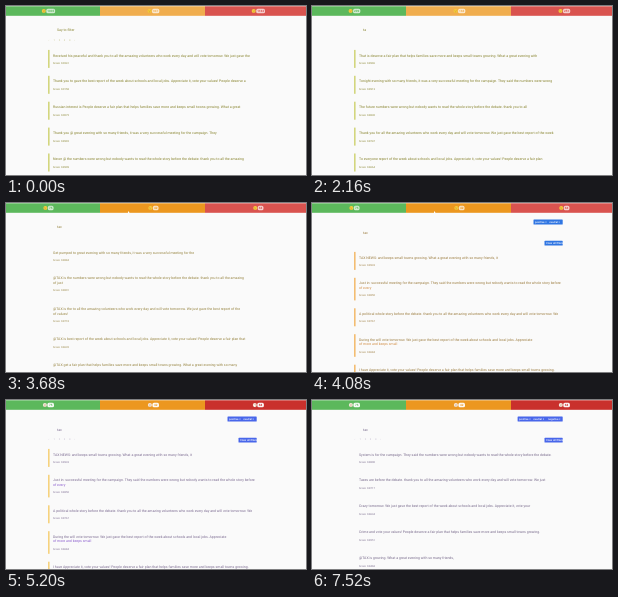
An HTML page for the animation above (7.6 s loop, 300 by 169 pixels).

```html
<!DOCTYPE html>
<html lang="en">
<head>
<meta charset="utf-8">
<title>Message sentiment</title>
<style>
  html, body { margin: 0; width: 100%; height: 100%; overflow: hidden; background: #fafafa; }
  svg { display: block; width: 100vw; height: 100vh; }
  text { font: 3.5px Roboto, "Open Sans", sans-serif; text-rendering: geometricPrecision; }
  .meta { font-size: 2.6px; }
  .count { font-size: 3px; text-anchor: middle; font-weight: 700; }
  .chip text { font-size: 2.7px; font-weight: 500; fill: #fff; }
  .olive  { --ink: #85802a; --link: #85802a; --edge: #d3d67e; --pale: #c6c48c; }
  .brown  { --ink: #94803c; --link: #94803c; --edge: none; --pale: #c9c3ac; }
  .amber  { --ink: #9a7a3c; --link: #d18c42; --edge: #f3bd72; --pale: none; }
  .violet { --ink: #79688f; --link: #8859cc; --edge: #f6d27e; --pale: #c4bccf; }
  .plum   { --ink: #76688a; --link: #76688a; --edge: none; --pale: #c4bccf; }
  .ink { fill: var(--ink); }
  .link { fill: var(--link); }
  .edge { fill: var(--edge); }
  .pale { fill: var(--pale); }
</style>
</head>
<body>
<svg id="stage" viewBox="0 0 300 169" preserveAspectRatio="none"></svg>
<script>
const LOOP = 7600, STEP = 80;
const stage = document.getElementById('stage');

const WORDS = ('thank you to all the amazing volunteers who work every day and will vote tomorrow. ' +
  'We just gave the best report of the week about schools and local jobs. Appreciate it, vote your values! ' +
  'People deserve a fair plan that helps families save more and keeps small towns growing. ' +
  'What a great evening with so many friends, it was a very successful meeting for the campaign. ' +
  'They said the numbers were wrong but nobody wants to read the whole story before the debate.').split(' ');

function add(parent, tag, attrs, content) {
  const node = document.createElementNS('http://www.w3.org/2000/svg', tag);
  for (const key in attrs) node.setAttribute(key, attrs[key]);
  if (content) node.textContent = content;
  parent.appendChild(node);
  return node;
}
const box = (parent, x, y, width, height, attrs) =>
  add(parent, 'rect', { x, y, width, height, ...attrs });
const label = (parent, x, y, content, cls) =>
  add(parent, 'text', { x, y, class: cls }, content);

// Extends the opening word by word to the length closest to the wanted width.
function sentence(parent, y, opening, width, offset, cls) {
  const node = label(parent, 47, y, opening, cls);
  let line = opening, gap = width - node.getComputedTextLength();
  for (let i = offset; ; i++) {
    const next = line + ' ' + WORDS[i % WORDS.length];
    node.textContent = next;
    const nextGap = width - node.getComputedTextLength();
    if (Math.abs(nextGap) > Math.abs(gap)) break;
    line = next;
    gap = nextGap;
  }
  node.textContent = line;
}

// Row: [opening words, right edge, right edge of a second line]
function list(top, rows, seed) {
  const group = add(stage, 'g', {});
  let y = top;
  rows.forEach(([opening, right, right2], i) => {
    const extra = right2 ? 4.6 : 0;
    const offset = seed + i * 17;
    box(group, 42, y - 5.5, 1.6, 18 + extra, { class: 'edge' });
    sentence(group, y + 1.1, opening, right - 47, offset, 'ink');
    if (right2) sentence(group, y + 5.7, 'of', right2 - 47, offset + 31, 'link');
    label(group, 47, y + 8.5 + extra, 'Score: 0.' + (9241 - seed * 7 - i * 83), 'meta ink');
    y += 25.9 + extra;
  });
  return group;
}

const everyone = [['Received his peaceful and', 244], ['Thank you to', 242], ['Russian interest is', 238],
  ['Thank you @', 212], ['Never @', 245]];
const mixed = [['To everyone', 230], ['Thank you for', 243], ['The future', 216], ['Tonight', 240], ['That is', 224]];
const taxed = [['Get pumped to', 192], ['@TAX is', 246, 58], ['@TAX is the', 238, 66],
  ['@TAX is', 240], ['@TAX get', 236]];
const neutral = [['TAX NEWS:', 186], ['Just in:', 244, 62], ['A political', 246],
  ['During the', 212, 83], ['I have', 244]];
const negative = [['System is', 240], ['Taxes are', 236], ['Crazy', 215], ['Crime and', 222], ['@TAX is', 143]];

const lists = [
  [0, list(49.4, everyone, 0)],
  [1840, list(49.4, mixed, 22)],
  [2160, list(49.4, mixed.slice().reverse(), 35)],
  [2560, list(49.4, taxed, 51)],
  [3920, list(54.4, neutral, 44)],
  [5760, list(54.4, negative, 63)]
];
const themes = [[0, 'olive'], [2560, 'brown'], [3920, 'amber'], [4880, 'violet'], [5760, 'plum']];
const queries = [[0, 'Say to filter'], [1200, ''], [1600, 't'], [2000, 'ta'], [2400, 'tax']];

const query = label(stage, 51, 25.2, '', 'ink');
const pager = add(stage, 'g', {});
['‹', '1', '2', '3', '4', '›'].forEach((mark, i) => label(pager, 42.5 + i * 5.1, 0, mark, 'meta pale'));

// Header
const tabs = [
  { x: 0, w: 94, mid: 42.7, base: '#5cb85c', hot: '#5cb85c', at: LOOP, counts: ['1035', '814', '209', '75'] },
  { x: 94, w: 105, mid: 147.7, base: '#f0ad4e', hot: '#ec971f', at: 3600, counts: ['947', '702', '168', '42'] },
  { x: 199, w: 101, mid: 252.6, base: '#d9534f', hot: '#c9302c', at: 4960, counts: ['1184', '930', '251', '68'] }
];
for (const tab of tabs) {
  tab.bar = box(stage, tab.x, .3, tab.w, 9.5);
  tab.face = add(stage, 'circle', { cy: 5.1, r: 2 });
  tab.eyes = add(stage, 'path', { fill: 'none', stroke: '#9b6a2a', 'stroke-width': .4 });
  tab.pill = box(stage, 0, 2.8, 0, 4.5, { rx: 1.6, fill: '#fff' });
  tab.num = label(stage, 0, 6.1, '', 'count');
}

// Filter buttons
function chip(x, y, h, names, gap) {
  const group = add(stage, 'g', { class: 'chip' });
  box(group, x, y, 250.7 - x, h, { rx: .6 });
  names.forEach((name, i) => label(group, x + 1.5 + i * gap, y + h / 2 + 1, name));
  return group;
}
const pair = chip(221.5, 16.4, 5.2, ['positive ×', 'neutral ×'], 14.5);
const trio = chip(205.6, 16.4, 5.2, ['positive ×', 'neutral ×', 'negative ×'], 14.5);
const clear = chip(232.5, 37.8, 4.8, ['Clear all filters'], 0);

const pointer = add(stage, 'path', { d: 'M0 0V2.4L.6 1.9 1 2.7 1.4 2.5 1 1.7H1.7Z' });
const route = [[2880, 60, 22], [3280, 69, 12.3], [3680, 122, 8], [4240, 122, 8], [4400, 126, 7],
  [4560, 128, 6.5], [4720, 146, 5.5], [4880, 160, 5], [5200, 248, 4.5], [5760, 248, 4.5],
  [6240, 229.5, 12], [6400, 226, 17]];

const pick = (track, t) => track.reduce((value, [start, next]) => t >= start ? next : value, null);
const show = (node, on) => node.setAttribute('display', on ? 'inline' : 'none');
function set(node, attrs) { for (const key in attrs) node.setAttribute(key, attrs[key]); }

function place(t) {
  for (let i = 1; i < route.length; i++) {
    const [t0, x0, y0] = route[i - 1], [t1, x1, y1] = route[i];
    if (t <= t1) {
      const k = (t - t0) / (t1 - t0);
      return [x0 + (x1 - x0) * k, y0 + (y1 - y0) * k];
    }
  }
  return route[route.length - 1].slice(1);
}

function draw(t) {
  stage.setAttribute('class', pick(themes, t));
  const current = pick(lists, t);
  lists.forEach(([, group]) => show(group, group === current));

  const filtered = t >= 3920, late = t >= 4880;
  query.textContent = pick(queries, t);
  query.setAttribute('y', filtered ? 30.7 : 25.2);
  show(pager, t < 1600 || late);
  pager.setAttribute('transform', `translate(0 ${late ? 40.3 : 35})`);

  const phase = pick([[0, 0], [1840, 1], [2160, 2], [2560, 3]], t);
  for (const tab of tabs) {
    const color = t >= tab.at ? tab.hot : tab.base;
    const count = tab.counts[phase];
    const pillW = late ? 6.6 : 2.6 + count.length * 1.55;
    const left = tab.mid - (pillW + 4.6) / 2;
    const cx = left + 1.8;
    tab.bar.setAttribute('fill', color);
    set(tab.face, { cx, fill: late ? '#f8e9df' : '#f8cd3b' });
    tab.eyes.setAttribute('d', `M${cx - .9} 4.5h.5M${cx + .4} 4.5h.5M${cx - .8} 5.9h1.6`);
    set(tab.pill, { x: left + 4.3, width: pillW, 'fill-opacity': late ? .95 : .72 });
    set(tab.num, { x: left + 4.3 + pillW / 2, fill: color });
    tab.num.textContent = count;
  }

  const blue = late ? '#4866ea' : '#2f75e2';
  [pair, trio, clear].forEach(group => group.setAttribute('fill', blue));
  show(pair, filtered && t < 5760);
  show(trio, t >= 5760);
  show(clear, filtered);

  const moving = t >= 2880 && t < 6480;
  show(pointer, moving);
  if (moving) {
    const [x, y] = place(t);
    set(pointer, { transform: `translate(${x} ${y})`, fill: y < 9.5 ? '#fff' : '#333' });
  }
}

function tick() {
  draw(Math.floor(performance.now() % LOOP / STEP) * STEP);
  requestAnimationFrame(tick);
}
tick();
</script>
</body>
</html>
```
